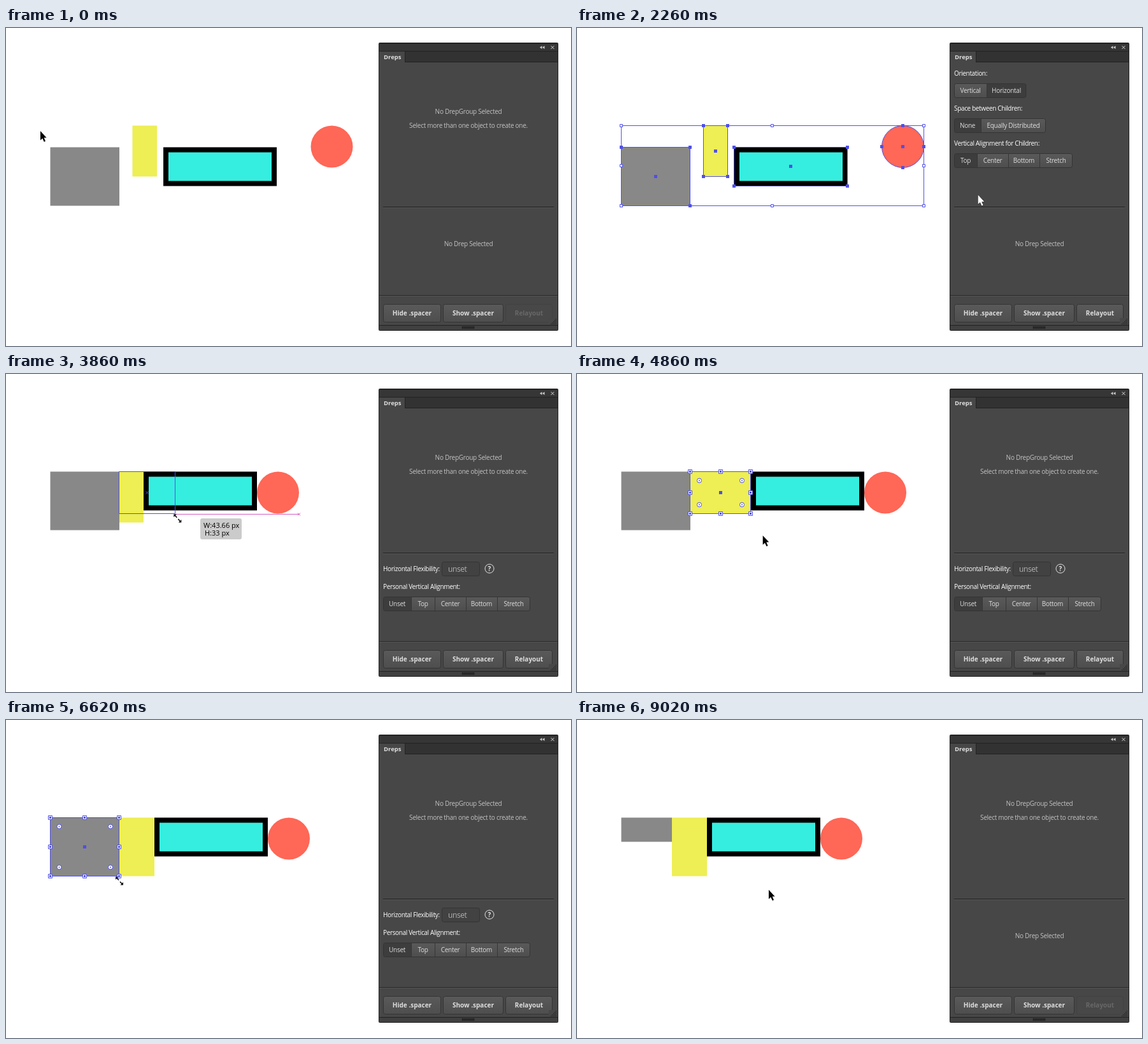
An HTML page with a canvas that plays this animation: 887 by 500 pixels, repeating every 9420 ms.

```html
<!DOCTYPE html>
<html lang="en">
<head>
<meta charset="utf-8">
<style>
html, body { margin: 0; width: 100%; height: 100%; overflow: hidden; background: #fff; }
canvas { display: block; }
</style>
</head>
<body>
<canvas id="stage" width="887" height="500"></canvas>
<script>
const ctx = document.getElementById('stage').getContext('2d');
const LOOP = 9420, BLUE = '#4f50e6', PINK = '#d45cc0';

// Pointer path: time, x, y (resting where a position repeats)
const PATH = [
  [0, 54, 162], [240, 43, 90], [380, 43, 90], [1000, 529, 316], [1120, 529, 316],
  [1820, 700, 152], [1960, 700, 152], [2560, 560, 372], [2880, 500, 320],
  [3120, 200, 200], [3200, 200, 200], [3420, 220, 239], [3530, 220, 239],
  [3960, 277, 225], [4250, 277, 225], [4700, 310, 290], [5000, 277, 225],
  [5100, 277, 225], [5600, 237, 249], [5750, 237, 249], [6100, 130, 215],
  [6240, 130, 215], [6620, 178, 253], [6760, 182, 251], [7220, 153, 197],
  [7350, 153, 197], [7690, 170, 283], [7860, 301, 267], [LOOP, 301, 267]
];

const within = (t, a, b) => t >= a && t < b;
const crisp = v => Math.ceil(v) - .5;

// stepped(t, first, time1, value1, time2, value2, ...)
function stepped(t, value, ...changes) {
  for (let i = 0; i < changes.length; i += 2) if (t >= changes[i]) value = changes[i + 1];
  return value;
}

function pointer(t) {
  const i = PATH.findIndex(k => k[0] > t);
  const [t0, x0, y0] = PATH[i - 1], [t1, x1, y1] = PATH[i];
  const u = (t - t0) / (t1 - t0), s = u * u * (3 - 2 * u);
  return [x0 + (x1 - x0) * s, y0 + (y1 - y0) * s];
}

function box(x, y, w, h, fill, stroke, radius = 0) {
  ctx.beginPath();
  ctx.roundRect(x, y, w, h, radius);
  if (fill) { ctx.fillStyle = fill; ctx.fill(); }
  if (stroke) { ctx.strokeStyle = stroke; ctx.lineWidth = 1; ctx.stroke(); }
}

function outline(x, y, w, h, radius) {
  const left = crisp(x), top = crisp(y);
  box(left, top, crisp(x + w) - left, crisp(y + h) - top, null, BLUE, radius);
}

function line(color, ...points) {
  ctx.beginPath();
  for (let i = 0; i < points.length; i += 2) ctx.lineTo(points[i], points[i + 1]);
  ctx.strokeStyle = color;
  ctx.lineWidth = 1;
  ctx.stroke();
}

function cross(x, y, r, color) {
  line(color, x - r, y - r, x + r, y + r);
  line(color, x - r, y + r, x + r, y - r);
}

function text(str, x, y, { size = 10, color = '#c2c2c2', align = 'left', weight = 400, spacing = 0 } = {}) {
  ctx.font = `${weight} ${size}px "Open Sans", sans-serif`;
  ctx.letterSpacing = spacing + 'px';
  ctx.textAlign = align;
  ctx.textBaseline = 'alphabetic';
  ctx.fillStyle = color;
  ctx.fillText(str, x, Math.round(y + size * .36));
}

const note = (str, y) => text(str, 726, y, { align: 'center', spacing: -.27 });
const label = (str, y) => text(str, 592, y, { color: '#fff', weight: 500, spacing: -.35 });

function raised(y, h) {
  const g = ctx.createLinearGradient(0, y, 0, y + h);
  g.addColorStop(0, '#5a5a5a');
  g.addColorStop(1, '#4e4e4e');
  return g;
}

function button(name, x, w, enabled = true) {
  box(x + .5, 434.5, w - 1, 28, enabled ? raised(434, 28) : '#484848', enabled ? '#343434' : '#424242', 3);
  text(name, x + w / 2, 448.5, { weight: 700, align: 'center', color: enabled ? '#dedede' : '#686868' });
}

function segments(y, edges, names, selected) {
  const left = edges[0], width = edges.at(-1) - left;
  box(left + .5, y + .5, width - 1, 22, raised(y, 22), null, 3);
  names.forEach((name, i) => {
    const x = edges[i], w = edges[i + 1] - x;
    if (i === selected) box(x + .5, y + .5, w, 22, '#3d3d3d', null, 3);
    if (i) line('#363636', x + .5, y, x + .5, y + 23);
    text(name, x + w / 2, y + 11.5, { align: 'center', color: '#dedede', spacing: -.27 });
  });
  box(left + .5, y + .5, width - 1, 22, null, '#343434', 3);
}

function groupPane() {
  label('Orientation:', 71.5);
  segments(87, [592, 643, 705], ['Vertical', 'Horizontal'], 1);
  label('Space between Children:', 126.5);
  segments(142, [592, 634, 736], ['None', 'Equally Distributed'], 0);
  label('Vertical Alignment for Children:', 181.5);
  segments(197, [592, 628, 677, 726, 778], ['Top', 'Center', 'Bottom', 'Stretch'], 0);
}

function itemPane() {
  label('Horizontal Flexibility:', 306.5);
  box(684.5, 295.5, 59, 22, '#424242', '#343434', 3);
  text('unset', 694, 306.5, { size: 12, color: '#b0b0b0', spacing: -.4 });
  ctx.beginPath();
  ctx.arc(759, 306, 7, 0, 7);
  ctx.strokeStyle = '#e4e4e4';
  ctx.stroke();
  text('?', 759, 306.5, { align: 'center', weight: 700, color: '#e4e4e4' });
  label('Personal Vertical Alignment:', 334.5);
  segments(350, [592, 636, 673, 722, 771, 823], ['Unset', 'Top', 'Center', 'Bottom', 'Stretch'], 0);
}

function panel(t) {
  const grouped = within(t, 1880, 2950), itemChosen = within(t, 3160, 8960);
  ctx.save();
  ctx.shadowColor = 'rgba(0,0,0,.15)';
  ctx.shadowBlur = 3;
  box(585, 23, 282, 453, '#222', null, 2);
  ctx.restore();
  box(586, 25, 280, 11, '#363636');
  box(586, 37, 280, 16, '#323232');
  box(586, 54, 280, 413, '#474747');
  line('#222', 626, 53.5, 866, 53.5);
  box(586, 37, 40, 17, '#474747');
  line('#222', 626.5, 37, 626.5, 53);
  text('Dreps', 593, 45.5, { weight: 700, size: 9.5, color: '#e0e0e0' });
  ctx.fillStyle = '#ccc';
  for (const x of [838, 842]) {
    ctx.beginPath();
    ctx.moveTo(x, 30.5); ctx.lineTo(x + 3.5, 28); ctx.lineTo(x + 3.5, 33);
    ctx.fill();
  }
  cross(858, 30.5, 2.5, '#d4d4d4');

  if (grouped) groupPane();
  else {
    note('No DrepGroup Selected', 131.5);
    note('Select more than one object to create one.', 153.5);
  }
  line('#1e1e1e', 592, 281.5, 860, 281.5);
  line('#585858', 592, 282.5, 860, 282.5);
  if (itemChosen) itemPane();
  else note('No Drep Selected', 339.5);

  line('#262626', 586, 420.5, 866, 420.5);
  line('#555', 586, 421.5, 866, 421.5);
  button('Hide .spacer', 592, 91);
  button('Show .spacer', 686, 95);
  button('Relayout', 784, 74, within(t, 1940, 2950) || itemChosen);
  box(852, 456, 13, 11, '#474747');
  for (let i = 0; i < 5; i++)
    for (let j = 0; j <= i; j++) box(863 - 2 * j, 457 + 2 * i, 1, 1, '#161616');
  line('#222', 586, 467.5, 866, 467.5);
  box(586, 468, 280, 7, '#404040');
  for (let x = 716; x < 736; x += 2) box(x, 469, 1, 4, '#111');
}

// Rectangles [x, y, w, h] of the four artboard objects
function layout(t) {
  if (t < 2500) return [[69.5, 187.5, 108.5, 92], [198.5, 153.5, 38.5, 80], [247, 187.5, 178, 61], [478.5, 153.5, 66, 66]];
  const gray = t < 7240 ? [108.5, 92] : [79.5, 38];
  const yellow = stepped(t, [38, 80], 3980, [95, 66], 5660, [55, 92]);
  const yellowX = 70 + stepped(t, 108, 7450, 79);
  const cyanX = yellowX + stepped(t, 38, 4200, 95, 5800, 55);
  return [[69.5, 153.5, ...gray], [yellowX, 153.5, ...yellow], [cyanX, 153.5, 178, 61], [cyanX + 178, 153.5, 66, 66]];
}

function objects([gray, yellow, cyan, circle]) {
  box(...gray, '#888');
  box(...yellow, '#eeee55');
  const [x, y, w, h] = cyan;
  box(x, y, w, h, '#000');
  box(x + 8, y + 8, w - 16, h - 16, '#35eedf');
  box(...circle, '#ff6757', null, 33);
}

function dot(x, y, r = 2.5) {
  box(crisp(x) - r, crisp(y) - r, 2 * r, 2 * r, BLUE);
}

function handle(x, y, r = 2) {
  box(crisp(x) - r, crisp(y) - r, 2 * r, 2 * r, '#fff', BLUE);
}

function eachEdgePoint([x, y, w, h], draw) {
  for (const i of [0, .5, 1])
    for (const j of [0, .5, 1]) if (i !== .5 || j !== .5) draw(x + w * i, y + h * j, i, j);
}

function selectAll(rects) {
  rects.forEach((r, n) => {
    const [x, y, w, h] = r, round = n === 3;
    outline(...r, round ? 33 : 0);
    dot(x + w / 2, y + h / 2);
    eachEdgePoint(r, (px, py, i, j) => {
      if ((i === .5 || j === .5) === round) dot(px, py);
    });
  });
  const right = rects[3][0] + 66, bottom = rects[0][1] + rects[0][3];
  const bounds = [69.5, 154, right - 69.5, bottom - 153.5];
  outline(...bounds);
  eachEdgePoint(bounds, (x, y) => handle(x, y));
}

function selectOne(r) {
  const [x, y, w, h] = r;
  outline(...r);
  dot(x + w / 2, y + h / 2);
  eachEdgePoint(r, (px, py, i, j) => {
    handle(px, py, 3);
    dot(px, py, 1.5);
    if (i === .5 || j === .5) return;
    const cx = px + 14 * (1 - 2 * i), cy = py + 14 * (1 - 2 * j);
    box(cx - 3.5, cy - 3.5, 7, 7, '#fff', BLUE, 3.5);
    box(cx - 1, cy - 1, 2, 2, BLUE, null, 1);
  });
}

function dragPreview(t, [x, y], [px, py], circleRight) {
  const right = px - 4, grayDrag = t > 6700;
  let bottom = py - 6;
  if (!grayDrag) {
    for (const guide of [219, 245]) if (Math.abs(bottom - guide) < 4) bottom = guide;
    if (bottom === 219) {
      line(PINK, right, 220.5, circleRight, 220.5);
      cross(circleRight, 220.5, 2, PINK);
    }
    if (bottom === 245) {
      line(PINK, 70, 245.5, 178, 245.5);
      cross(178.5, 246, 2, PINK);
    }
  }
  const w = right - x, h = bottom + .5 - y;
  outline(x, y, w, h);
  cross(x + w / 2, y + h / 2, 2, BLUE);
  if (within(t, 5560, 5700)) return;
  const lx = Math.round(px) + 36, ly = Math.round(py);
  box(lx, ly, 65, 33, '#cbcbcb', null, 3);
  text(`W:${(w / 2).toFixed(2)} px`, lx + 5, ly + 11.5, { size: 11, color: '#000' });
  text(`H:${Math.round(h / 2)} px`, lx + 7, ly + 23.5, { size: 11, color: '#000' });
}

function arrow(x, y) {
  const light = x > 585;
  ctx.beginPath();
  for (const [dx, dy] of [[0, 0], [0, 14.5], [3.2, 11.5], [5.8, 17], [8, 16], [5.6, 10.6], [9.6, 10.4]]) ctx.lineTo(x + dx, y + dy);
  ctx.closePath();
  ctx.fillStyle = light ? '#fff' : '#000';
  ctx.strokeStyle = light ? '#222' : '#fff';
  ctx.lineWidth = 1;
  ctx.stroke();
  ctx.fill();
}

function resizeArrow(x, y) {
  ctx.fillStyle = ctx.strokeStyle = '#000';
  ctx.lineWidth = 1.5;
  for (const s of [-1, 1]) {
    ctx.beginPath();
    ctx.moveTo(x + 6 * s, y + 6.5 * s);
    ctx.lineTo(x + 6 * s, y + 2 * s);
    ctx.lineTo(x + 1.5 * s, y + 6.5 * s);
    ctx.fill();
    ctx.beginPath();
    ctx.moveTo(x + 4 * s, y + 4.5 * s);
    ctx.lineTo(x + 1 * s, y + 1.2 * s);
    ctx.stroke();
  }
}

function draw(t) {
  ctx.fillStyle = '#fff';
  ctx.fillRect(0, 0, 887, 500);
  const rects = layout(t), tip = pointer(t);
  objects(rects);

  if (within(t, 380, 1100)) {
    const [x, y] = pointer(Math.max(380, t - 16));
    ctx.setLineDash([2, 1]);
    line('#555', 43.5, y - 1, 43.5, 89.5, x - 1, 89.5);
    ctx.setLineDash([]);
  }
  if (within(t, 1100, 2950)) selectAll(rects);

  const target = rects[t < 6180 ? 1 : 0];
  if (within(t, 3530, 3980) || within(t, 5100, 5660) || within(t, 6760, 7240))
    dragPreview(t, target, tip, rects[3][0] + 66);
  else if (within(t, 3160, 8960)) selectOne(target);

  panel(t);
  const resizing = within(t, 3390, 4300) || within(t, 4940, 5790) || within(t, 6550, 7380);
  (resizing ? resizeArrow : arrow)(...tip);
}

const start = performance.now();
function frame() {
  draw((performance.now() - start) % LOOP);
  requestAnimationFrame(frame);
}
frame();
</script>
</body>
</html>
```
